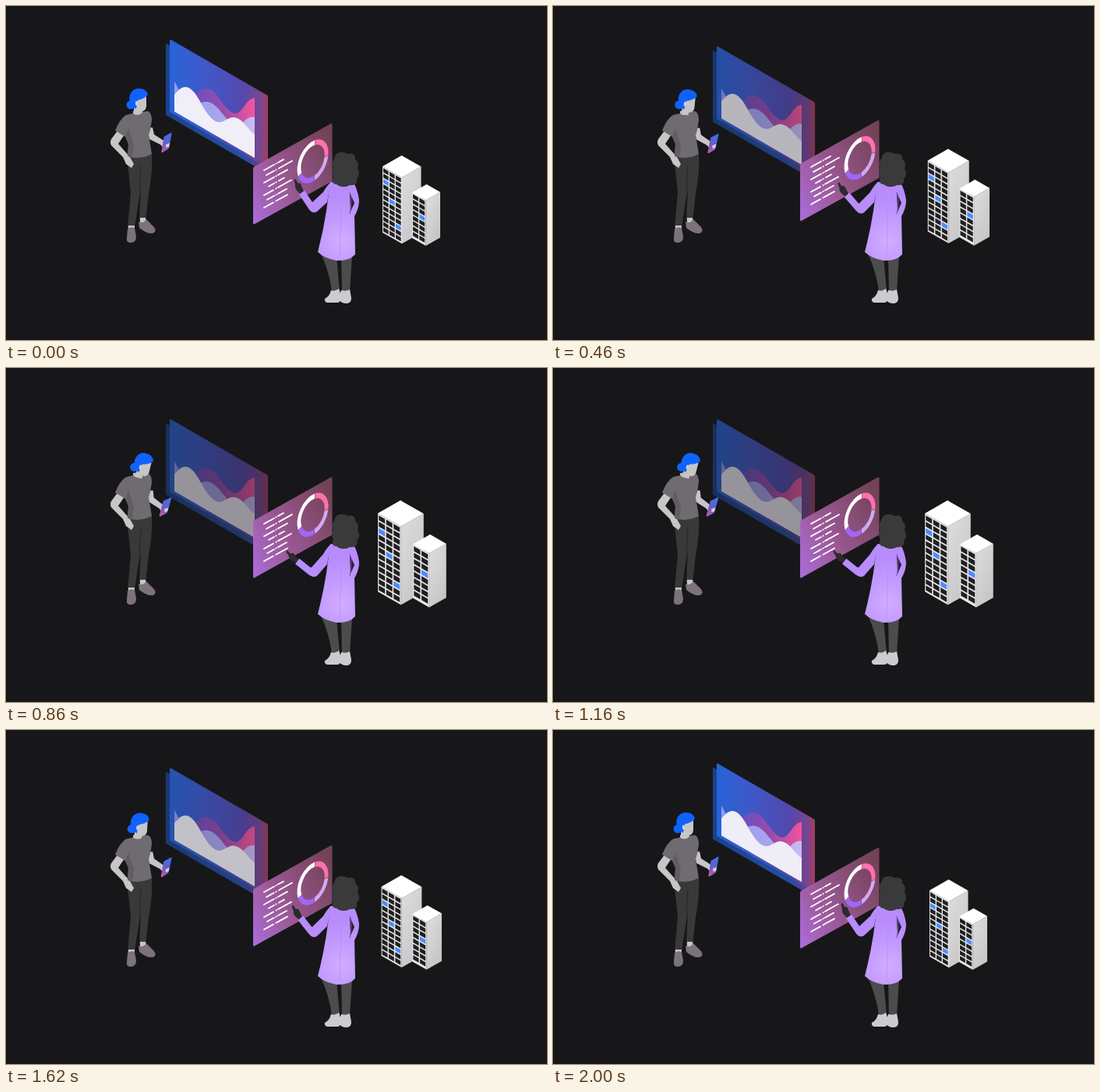
Recreate the animation shown at these times as an HTML page. Size 694 by 429 pixels, loop 2.02 s.

```html
<!DOCTYPE html>
<html lang="en">
<head>
<meta charset="utf-8">
<title>Dashboards</title>
<style>
html, body { margin: 0; width: 100%; height: 100%; overflow: hidden; background: #171719; }
svg { display: block; width: 694px; height: 429px; }
</style>
</head>
<body>
<svg viewBox="0 0 694 429">
<defs>
  <linearGradient id="screenFill">
    <stop stop-color="#2864d8"/><stop offset=".35" stop-color="#4059c9"/>
    <stop offset=".74" stop-color="#5448ae"/><stop offset=".93" stop-color="#78468f"/><stop offset="1" stop-color="#a3426a"/>
  </linearGradient>
  <linearGradient id="backFill">
    <stop stop-color="#1c428c"/><stop offset=".8" stop-color="#2450a4"/><stop offset="1" stop-color="#703b84"/>
  </linearGradient>
  <linearGradient id="pinkFill">
    <stop offset=".2" stop-color="#6650c4"/><stop offset=".6" stop-color="#964cae"/><stop offset="1" stop-color="#f5559b"/>
  </linearGradient>
  <linearGradient id="lilacFill">
    <stop stop-color="#8f9cf3"/><stop offset=".6" stop-color="#aaa5ef"/><stop offset="1" stop-color="#cabcf0"/>
  </linearGradient>
  <linearGradient id="panelFill" x1="0" y1="1" x2="1" y2=".2">
    <stop stop-color="#b071e4"/><stop offset=".4" stop-color="#a25c9e"/><stop offset="1" stop-color="#784459"/>
  </linearGradient>
  <radialGradient id="coatFill" gradientUnits="userSpaceOnUse" cx="430" cy="302" r="58">
    <stop stop-color="#d2adff"/><stop offset=".5" stop-color="#c29aff"/><stop offset="1" stop-color="#b88cfb"/>
  </radialGradient>
  <linearGradient id="phoneFill" x1=".6" y1="0" x2=".3" y2="1">
    <stop stop-color="#3a70e8"/><stop offset=".55" stop-color="#6a5bc8"/><stop offset="1" stop-color="#c05aa8"/>
  </linearGradient>
  <linearGradient id="wallFill" x2=".6" y2="1">
    <stop stop-color="#dededf"/><stop offset="1" stop-color="#c6c5c7"/>
  </linearGradient>
</defs>

<g id="screen">
  <path d="M205 48L330 120V212L205 140Z" fill="url(#backFill)"/>
  <path d="M210 44.500Q210 42.500 212 43.600L334 114Q336 115 336 117V208L210 136Z" fill="url(#screenFill)"/>
  <path d="M330 112V204.500L336 208V117Q336 115 334 114Z" fill="#a03c60" opacity=".4"/>
  <path d="M216 97C222 109 226 118 232 120C241 120 245 106 257 106C272 107 279 134 293 138C304 139 307 119 319 118V195L216 135.500Z" fill="url(#pinkFill)"/>
  <path d="M216 97L222 108L230 130C244 134 244 123 257 123C273 124 280 148 294 153C305 155 307 140 319 143V195L216 135.500Z" fill="url(#lilacFill)"/>
  <path d="M216 114C221 108 225 104 230 104C245 104 252 137 267 147C278 154 283 142 293 143C304 145 308 156 319 165V195L216 135.500Z" fill="#f0eef6"/>
</g>

<g id="panel">
  <path d="M317 209Q317 207 319 206L416 151.500Q418.500 150 418.500 153V225L319 280Q317 281 317 279Z" fill="url(#panelFill)" opacity=".96"/>
  <path id="rows" stroke="#fff" stroke-width="1.800" stroke-linecap="round"/>
  <g id="donut" transform="matrix(1 -.555 0 1.300 393.500 199.500)" fill="none" stroke-width="4.800"></g>
</g>

<g id="towers"></g>

<g id="manager">
  <path d="M155 192L187 189C188 208 186 226 183 240L179 277L171 276L173 232L165 284L156 285L160 240Z" fill="#393939"/>
  <path d="M173 205L171 236" stroke="#2d2d2e" stroke-width="1.500"/>
  <path d="M157 282L165 282L165 287L157 287ZM172 272L179 272L180 279L172 279Z" fill="#c6c6c6"/>
  <path d="M156 286Q161 283 165 285L167 296Q167 304 160 304Q154 304 155 298Z" fill="#7c727b"/>
  <path d="M170 277Q176 280 180 274L190 284Q194 290 188 292Q181 293 171 285Z" fill="#7c727b"/>
  <path d="M163 135L175 133L176 141L163 143Z" fill="#bdbdbd"/>
  <g id="phoneArm">
    <path d="M181 157L188 156L190 165L204 174L210 176L209 181L203 183L198 178L184 171Z" fill="#c6c6c6"/>
    <path d="M202.500 168L211 163Q213 162 212.500 164L209.500 181Q209 183 207.500 184L201 188Q199 189 199.500 186.500Z" fill="url(#phoneFill)"/>
    <path d="M205 178L210 176L209 181L205.500 182Z" fill="#d6cfdc"/>
  </g>
  <path d="M144 159L152 165L144 177L159 194L164 203L161 208L154 203L150 194L135 179Q133 175 135 171Z" fill="#c6c6c6"/>
  <path d="M154 140L163 138Q169 143 176 136L182 135Q187 137 187 147L185 159L183 166L187 190Q172 198 156 193L157 177L153 168L140 160Q146 145 154 140Z" fill="#706b70"/>
  <path d="M157 157L153 168L157 177L156 193L162 194L164 178Z" fill="#625d63"/>
  <g id="head">
    <path d="M164 121L180 116L180 129Q179 136 173 135L173 139L164 139Z" fill="#c6c6c6"/>
    <circle cx="160" cy="127" r="5.500" fill="#0f62fe"/>
    <path d="M159 123C156 112 164 105 171 106Q180 106 182 114Q178 119 169 121L167 132Q161 131 159 123Z" fill="#0f62fe"/>
    <ellipse cx="167.500" cy="125" rx="1.600" ry="3" fill="#d0d0d0"/>
  </g>
</g>

<g id="analyst">
  <path d="M404 318L424 322L428 366L418 367Q415 342 404 318ZM430 324L444 320L441 367L431 367Z" fill="#4c4c4d"/>
  <path d="M417 365Q422 367 427 363L430 372Q430 381 425 381L412 381Q408 380 409 376Q415 373 417 365ZM430 365Q437 367 441 364L443 375Q443 382 437 382Q429 382 427 376Z" fill="#cbcbd0"/>
  <path d="M416 226L446 227Q451 236 453 249Q453 260 447 270L448 319Q440 328 424 327Q408 324 400 316Q407 289 411 263Z" fill="url(#coatFill)"/>
  <path d="M430 252L428 322" stroke="#b286f2" opacity=".6"/>
  <path d="M441 240L447 253L442 264Z" fill="#232127"/>
  <path d="M441 239Q445 249 441 267" fill="none" stroke="#7448ae"/>
  <g id="hand">
    <path d="M382 246L374 238Q370 234 371 229L369.500 224Q370 221 372 223L374 227L378 228Q379 232 383 240Z" fill="#2b2b2c"/>
    <path d="M383 237L376 242L388 260Q393 267 399 262L401 254L393 252Z" fill="#b88cfb"/>
  </g>
  <path id="sleeve" fill="#b88cfb"/>
  <path d="M423 191C427 186 436 188 438 190C445 188 449 192 448 197C453 200 452 206 451 209C455 215 452 220 450 222C452 228 446 231 441 230C435 234 427 232 424 229C418 229 418 223 420 220C417 215 418 210 420 208C417 201 420 198 421 196Z" fill="#3a3a3b"/>
</g>
</svg>
<script>
const $ = id => document.getElementById(id);

// Text rows on the panel: left start, left end, right start, right end.
const rows = [[331, 344, 349, 356], [334, 344, 350, 367], [331, 344, 349, 361], [337, 344, 350, 357],
  [331, 343, 349, 366], [335, 344, 349, 360], [331, 343, 348, 361]];
$('rows').setAttribute('d', rows.map(([a, b, c, d], i) => {
  const y = x => 211 + i * 8 - (x - 331) * .555;
  const bar = (m, n) => `M${m} ${y(m)}L${n} ${y(n)}`;
  return bar(a, b) + bar(346.4, 346.8) + bar(c, d);
}).join(''));

// Ring segments: start angle, end angle in degrees, colour.
const radius = 17.6;
const point = a => `${radius * Math.cos(a * Math.PI / 180)} ${radius * Math.sin(a * Math.PI / 180)}`;
$('donut').innerHTML = [[160, 278, '#fff'], [280, 367, '#ff70ae'], [369, 442, '#d0a8f5'], [84, 158, '#a166f6']]
  .map(([a, b, c]) => `<path d="M${point(a)}A${radius} ${radius} 0 0 1 ${point(b)}" stroke="${c}"/>`).join('');

// Isometric tower with its left top corner at x, y; lit lists windows as "column,row".
function tower(x, y, w, right, h, cols, count, top, lit) {
  const slope = .57, step = (w - 1) / cols, drop = w * slope, back = right * slope;
  let panes = '';
  for (let c = 0; c < cols; c++)
    for (let r = 0; r < count; r++)
      panes += `<rect x="${1 + c * step}" y="${top + r * 6.9}" width="${step - 1.4}" height="5.2" fill="${lit.includes(c + ',' + r) ? '#4a8cff' : '#202022'}"/>`;
  return `<path d="M${x} ${y}l${w} ${drop}v${h}l${-w} ${-drop}z" fill="#e6e6e7"/>
    <path d="M${x + w} ${y + drop}l${right} ${-back}v${h}l${-right} ${back}z" fill="url(#wallFill)"/>
    <path d="M${x} ${y}l${right} ${-back}l${w} ${drop}l${-right} ${back}z" fill="#fff"/>
    <g transform="matrix(1 ${slope} 0 1 ${x} ${y})">${panes}</g>`;
}
$('towers').innerHTML = tower(483, 206, 25, 24.5, 85, 3, 12, 1.8, ['0,2', '1,5', '2,9']) +
  tower(521, 239.5, 17.5, 18.5, 58.5, 2, 8, 1.8, ['1,3']);

const place = (id, value) => $(id).setAttribute('transform', value);

function draw(now) {
  const t = now % 2020 / 1010;
  const x = t > 1 ? 2 - t : t;
  const p = x < .5 ? 4 * x ** 3 : 1 - 4 * (1 - x) ** 3;
  place('screen', `translate(0 ${23 * p})`);
  $('screen').setAttribute('opacity', 1 - .42 * Math.sqrt(p));
  place('panel', `translate(0 ${-11 * p})`);
  place('towers', `translate(515 311) scale(${1 + .187 * p}) translate(-515 -311)`);
  place('head', `translate(${p} ${2 * p}) rotate(${14 * p} 168 141)`);
  place('phoneArm', `translate(0 ${p}) rotate(${6 * p} 186 162)`);
  place('hand', `translate(0 ${3 * p}) rotate(${-18 * p} 395 261)`);
  const y = 3 * p;
  $('sleeve').setAttribute('d', `M417 226Q412 230 407 239L393 ${252 + y}L388 ${260 + y}Q393 ${268 + y} 399 ${264 + y}L412 252Z`);
  requestAnimationFrame(draw);
}
requestAnimationFrame(draw);
</script>
</body>
</html>
```
